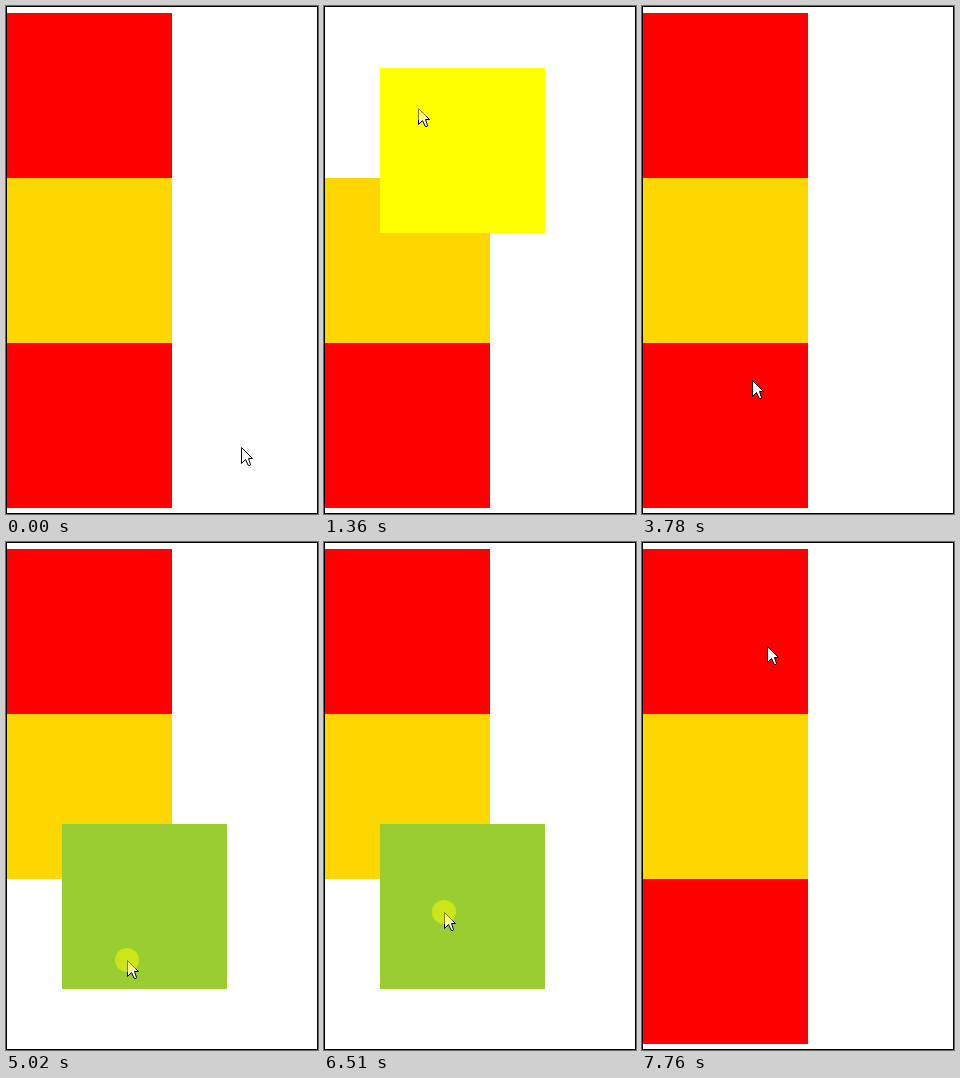
An HTML page with a canvas that plays this animation: 312 by 508 pixels, repeating every 7990 ms.

```html
<!DOCTYPE html>
<html lang="en">
<head>
<meta charset="utf-8">
<title>Pressed squares</title>
<style>
  html, body { margin: 0; width: 100%; height: 100%; overflow: hidden; background: #fff; }
  canvas { display: block; }
</style>
</head>
<body>
<canvas id="stage" width="312" height="508"></canvas>
<script>
const ctx = document.getElementById('stage').getContext('2d');
const LOOP = 7990;
const TICK = 76;
const SIDE = 165;
const SHIFT = 55;
const TOP = 7;
const START = { x: 235, y: 441 };

const squares = [
  { color: '#ff0000', pressed: '#ffff00', dy: SHIFT },
  { color: '#ffd700' },
  { color: '#ff0000', pressed: '#9acd32', dy: -SHIFT }
];
squares.forEach((s, i) => { s.y = TOP + i * SIDE; });

// The pointer reaches a square, presses it a few times and leaves at `until`.
const visits = [
  { arrive: 750, until: 1590, square: 0, x: 94, y: 102, hold: 345 },
  { arrive: 2290, until: 3780, square: 2, x: 110, y: 374, hold: 395, presses: 3 },
  { arrive: 4080, until: 4710, square: 0, x: 112, y: 104, hold: 200 },
  { arrive: 4940, until: 5580, square: 2, x: 121, y: 418 },
  { arrive: 5810, until: 6280, square: 0, x: 120, y: 104 },
  { arrive: 6430, until: 6970, square: 2, x: 120, y: 370 },
  { arrive: 7200, until: 7760, square: 0, x: 125, y: 104 }
];

const easeOut = p => 1 - (1 - p) ** 2;

function pointerAt(t) {
  let { x, y } = START;
  let leave = 0;
  for (const v of visits) {
    if (t < leave) break;
    const steps = Math.round((v.arrive - leave) / TICK);
    // Moves advance in whole ticks; the 5 ms absorbs their uneven spacing.
    const step = Math.floor((t - leave + 5) / (v.arrive - leave) * steps);
    const p = easeOut(Math.min(1, step / steps));
    x += (v.x - x) * p;
    y += (v.y - y) * p;
    leave = v.until;
  }
  return { x: Math.round(x), y: Math.round(y) };
}

// Presses of equal length are spread evenly over the visit.
function heldAt(t) {
  const visit = visits.find(v => t >= v.arrive && t < v.until);
  if (!visit) return null;
  const { arrive, until, hold = 160, presses = 2 } = visit;
  const pitch = (until - arrive - hold) / (presses - 1);
  return (t - arrive) % pitch < hold ? squares[visit.square] : null;
}

function drawPointer({ x, y }) {
  ctx.save();
  ctx.translate(x + 0.5, y + 0.5);
  ctx.fillStyle = '#fff';
  ctx.strokeStyle = '#000';
  ctx.lineWidth = 1;
  const arrow = new Path2D('M0 0V16L4 12L6.5 17.5L7.5 18H8.5L9 17L7 11H11Z');
  ctx.fill(arrow);
  ctx.stroke(arrow);
  ctx.restore();
}

function drawGlow({ x, y }) {
  ctx.fillStyle = 'rgba(255, 255, 0, 0.5)';
  ctx.beginPath();
  ctx.arc(x, y, 12, 0, Math.PI * 2);
  ctx.fill();
}

function drawSquare(x, y, color) {
  ctx.fillStyle = color;
  ctx.fillRect(x, y, SIDE, SIDE);
}

function draw(t) {
  ctx.fillStyle = '#fff';
  ctx.fillRect(0, 0, 312, 508);

  const held = heldAt(t);
  for (const s of squares) {
    if (s !== held) drawSquare(1, s.y, s.color);
  }
  if (held) drawSquare(1 + SHIFT, held.y + held.dy, held.pressed);

  const pointer = pointerAt(t);
  drawPointer(pointer);
  if (held) drawGlow(pointer);

  ctx.strokeStyle = '#000';
  ctx.lineWidth = 1;
  ctx.strokeRect(0.5, 0.5, 311, 507);
}

const begin = performance.now();
function tick() {
  draw((performance.now() - begin) % LOOP);
  requestAnimationFrame(tick);
}
tick();
</script>
</body>
</html>
```
